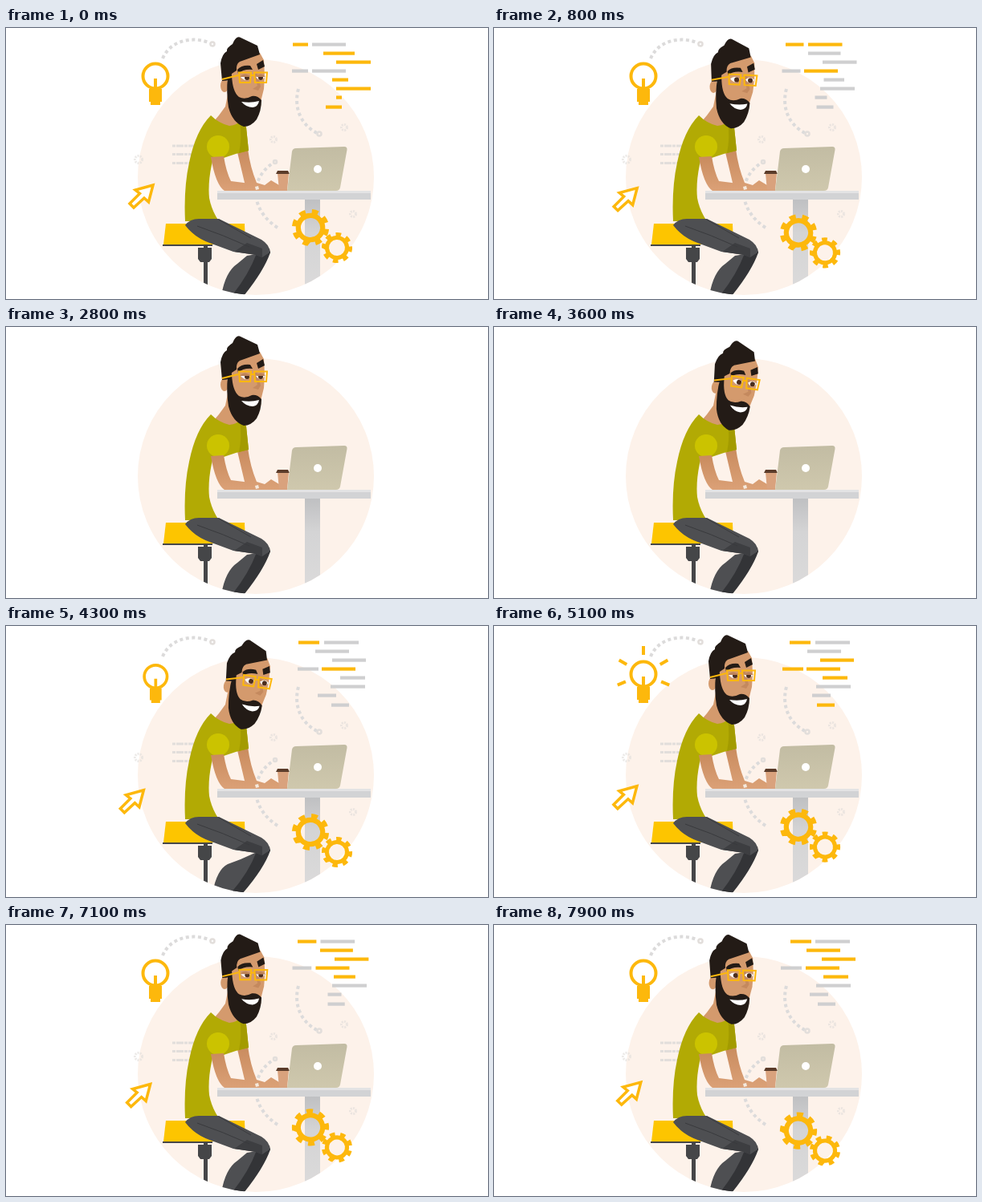
Animation of 600 by 338 pixels, one loop 8000 ms. Source, as an HTML page:

```html
<!DOCTYPE html>
<html lang="en">
<head>
<meta charset="utf-8">
<title>Working at a laptop</title>
<style>
html, body { margin: 0; width: 100%; height: 100%; overflow: hidden; background: #fff; }
svg { display: block; width: 600px; height: 338px; }
.line { fill: none; stroke: #fdb80c; }
.dots { fill: none; stroke: #dcdbdb; stroke-width: 4; stroke-dasharray: 4 3.6; }
.faint { fill: none; stroke: #e2dedb; }
</style>
</head>
<body>
<svg viewBox="0 0 600 338">
  <defs>
    <clipPath id="disc"><circle cx="311" cy="186" r="147"/></clipPath>
    <linearGradient id="lid" x2="0" y2="1"><stop stop-color="#c2bca3"/><stop offset="1" stop-color="#cfc8ad"/></linearGradient>
    <linearGradient id="post" x2="0" y2="1"><stop stop-color="#bfc0c2"/><stop offset=".35" stop-color="#d4d4d5"/><stop offset="1" stop-color="#dcdbdb"/></linearGradient>
    <linearGradient id="arm" x2="0" y2="1"><stop stop-color="#c98b5e"/><stop offset="1" stop-color="#dba177"/></linearGradient>
  </defs>
  <circle cx="311" cy="186" r="147" fill="#fdf2ea"/>

  <g id="faint">
    <path class="dots" d="M195 38C205 14 235 10 254 19M364 76C358 98 366 120 387 131M338 249C304 227 302 188 333 168"/>
    <g class="faint" stroke-width="2.5">
      <circle cx="257" cy="20" r="2.5"/><circle cx="390" cy="132" r="2.5"/><circle cx="335" cy="167" r="2"/>
    </g>
    <path class="faint" stroke-width="3" stroke-dasharray="4 1 9 1" d="M207 147H236M207 157.500H236M207 168.500H236"/>
    <g class="faint" stroke-width="3" stroke-dasharray="2 1.200" opacity=".65">
      <circle cx="165" cy="164" r="4.500"/><circle cx="333" cy="139" r="3.500"/>
      <circle cx="421" cy="124" r="3.500"/><circle cx="432" cy="232" r="3.500"/>
    </g>
  </g>

  <g clip-path="url(#disc)">
    <path fill="url(#post)" d="M372 214h19v120h-19z"/>
    <path fill="#454648" d="M246 271h5v60h-5zM239 274h17v14l-3 4h-11l-3-4z"/>
    <path fill="#fdc500" d="M199 244H297L298 270H196Z"/>
    <path fill="#474747" d="M195 270h62v2h-62z"/>
  </g>

  <path fill="#d49a6d" d="M277 78L273 98L265 109L259 116L278 130L294 119L296 100Z"/>
  <path fill="url(#arm)" d="M288 155L301 151Q304 174 312 193L322 196L330 190L340 196L345 203H303L297 193Q293 176 288 155Z"/>
  <path fill="#b2aa04" d="M255 109Q265 119 278 122Q288 121 291 116Q297 118 299 124L302 153L286 157L271 162L257 166Q251 192 253 212Q256 228 265 241H223Q221 200 228 168Q236 128 255 109Z"/>
  <path fill="#a39b00" d="M291 116Q297 118 299 124L302 153L290 156Q294 137 291 116Z"/>
  <circle cx="264" cy="148" r="14" fill="#cbc300"/>
  <path fill="url(#arm)" d="M255 161L271 160Q274 179 280 191L304 194L315 199L313 203H272Q261 196 255 161Z"/>
  <path fill="#f4e9dd" d="M310 198l4-1 1 4-4 1z"/>

  <g clip-path="url(#disc)">
    <path id="shin" fill="#4e4f52"/>
    <path id="shade" fill="#333437"/>
    <path fill="#4e4f52" d="M223 246Q229 238 240 238H265L318 264Q329 271 328 280L319 286L311 283L283 279L256 269Q235 262 223 246Z"/>
    <path fill="#3d3e41" d="M300 268L319 275L319 286L311 283L284 279Z"/>
    <path fill="none" stroke="#393a3d" d="M238 247Q270 258 303 273M265 239L305 262"/>
  </g>

  <path fill="#d2d3d5" d="M263 203H454V214H263Z"/>
  <path fill="#e3e3e4" d="M263 203H454V206H263Z"/>
  <path fill="#d9a27d" d="M338 181h14l-2 22h-10z"/>
  <path fill="#5b3c2a" d="M338 178h13l2 4h-17z"/>
  <path fill="url(#lid)" d="M361 150L421 148Q425 148 424.500 152L416 199Q415 203 411 203H350L356 154Q357 150 361 150Z"/>
  <circle cx="388" cy="176" r="5" fill="#fff"/>

  <g id="head">
    <path fill="#d49a6d" d="M276 48L316 31L321 40L322 60L321 76L317 92L285 99L276 84Z"/>
    <path fill="#c4895e" d="M309 57L313 72L307 76L314 78L317 73L313 57Z"/>
    <ellipse cx="272" cy="72" rx="5" ry="8" fill="#d49a6d"/>
    <path fill="#231b16" d="M269 66L267 44Q269 32 275 29Q274 25 282 20Q286 10 291 11.500L313 22L316 33L291 42Q286 45 287 53L281 57L280 65Z"/>
    <path fill="#231b16" d="M276 62L281 59Q282 80 290 86Q297 90 306 85Q313 84 318 90Q318 103 312 114Q305 123 296 123Q282 118 277 99Q274 80 276 62Z"/>
    <path fill="#fff" d="M293 92Q305 94 315 91Q314 98 307 99Q299 99 293 92Z"/>
    <path fill="#231b16" d="M288 52Q293 46 304 47L307 52Q295 51 289 57ZM312 45L320 40L322 48L314 52Z"/>
    <path fill="#fff" d="M292 61q6-5 12 0q-5 8-12 0M311 61q6-5 11 0q-5 8-11 0"/>
    <circle cx="300" cy="62" r="3" fill="#4c2d1d"/><circle cx="317" cy="62" r="3" fill="#4c2d1d"/>
    <path id="lids" fill="#bd835a" d="M291 61q6-7 14 0zM311 61q6-7 12 0z"/>
    <path class="line" stroke-width="2" d="M269 64L289 59M290 55.500H305L304 68H291ZM309 55.500H325L324 68H310ZM305 59H309"/>
  </g>

  <g id="lines"></g>
  <g id="gears"></g>
  <g id="bulb">
    <circle class="line" cx="186" cy="60" r="15.500" stroke-width="4"/>
    <path fill="#fdb80c" d="M184 63h4v13h6v16h-2v4h-12v-4h-2V76h6z"/>
    <path id="rays" class="line" stroke-width="4"/>
  </g>
  <path id="arrow" fill="#fff" stroke="#fdb80c" stroke-width="3.500" d="M183 196L161 202L166.500 206.500L154 219L159 224L172 212L177.500 217Z"/>
</svg>

<script>
const $ = id => document.getElementById(id);
const set = (el, attrs) => { for (const k in attrs) el.setAttribute(k, attrs[k]); };
const make = (tag, parent, attrs) => {
  const el = parent.appendChild(document.createElementNS('http://www.w3.org/2000/svg', tag));
  set(el, attrs);
  return el;
};
const mix = (a, b, k) => a + (b - a) * k;
const ease = (a, b, x) => {
  const k = Math.min(1, Math.max(0, (x - a) / (b - a)));
  return k * k * (3 - 2 * k);
};
const wave = (t, period) => (1 - Math.cos(t / period * 2 * Math.PI)) / 2;

// Code lines: positions per pose, short and full widths; "y" marks yellow.
const rowY = [20, 20, 31, 42, 53, 53, 64, 75, 86, 98];
const shortW = [19, 42, 39, 43, 20, 42, 20, 43, 7, 20];
const fullW = [26, 43, 42, 42, 26, 42, 31, 43, 23, 22];
const poses = [
  { t: 0, full: 0, hue: 'ygyyggyyyy', x: [357, 381, 395, 411, 356, 381, 406, 411, 411, 398] },
  { t: 1600, full: 1, hue: 'yygggygggg', x: [369, 401, 387, 407, 361, 391, 415, 401, 388, 405] },
  { t: 4300, full: 1, hue: 'yggggygggg', x: [364, 396, 385, 406, 363, 393, 416, 404, 388, 405] },
  { t: 5100, full: 1, hue: 'yggyyyyggy', x: [368, 400, 390, 406, 359, 389, 409, 401, 396, 402] },
  { t: 6300, full: .25, hue: 'ygyyggyyyy', x: [357, 383, 393, 410, 356, 383, 406, 411, 408, 398] },
  { t: 7900, full: 1, hue: 'ygyygyyggg', x: [369, 400, 389, 408, 357, 388, 410, 401, 393, 403] }
];
const bars = rowY.map(y => make('rect', $('lines'), { y: y - 1.5, height: 4.2 }));

const gears = [[379, 249, 23, 1], [412, 274, 19, -1]].map(([x, y, r, dir]) => {
  const el = make('g', $('gears'), {});
  make('circle', el, { class: 'line', r: r * .66, 'stroke-width': r * .27 });
  make('circle', el, { class: 'line', r: r * .88, 'stroke-width': r * .25, pathLength: 16, 'stroke-dasharray': '1 1' });
  return { el, x, y, dir };
});

function drawLines(t, show) {
  let i = poses.findIndex(p => p.t > t) - 1;
  if (i < 0) i = poses.length - 2;
  const a = poses[i], b = poses[i + 1];
  const k = ease(a.t, b.t, t);
  const hue = (k < .5 ? a : b).hue;
  const full = mix(a.full, b.full, k);
  bars.forEach((bar, n) => set(bar, {
    x: mix(a.x[n], b.x[n], k),
    width: mix(shortW[n], fullW[n], full) * show,
    fill: hue[n] === 'y' ? '#fdb80c' : '#cfcfd0'
  }));
}

// Rays shoot outwards, then their inner ends catch up.
function drawRays(t) {
  const from = 24 + 11 * ease(5700, 6500, t), to = 24 + 11 * ease(4500, 4900, t);
  const d = [-150, -90, -30, 23, 157].map(deg => {
    const c = Math.cos(deg * Math.PI / 180), s = Math.sin(deg * Math.PI / 180);
    const at = r => `${186 + c * r} ${60 + s * r}`;
    return `M${at(from)}L${at(to)}`;
  }).join('');
  set($('rays'), { d, opacity: to - from > .1 ? 1 : 0 });
}

function draw(t) {
  const shown = end => 1 - ease(2200, 2600, t) + ease(3600, end, t);
  const show = shown(4200);
  const around = (x, y, k) => `translate(${x} ${y}) scale(${k}) translate(${-x} ${-y})`;

  const beat = t % 2400 / 2400;
  const nod = ease(.24, .46, beat) - ease(.82, .98, beat);
  set($('head'), { transform: `rotate(${8.3 * nod} 255 100)` });
  set($('lids'), { opacity: nod < .1 ? 1 : 0 });

  const step = t % 2000 / 2000;
  const kick = ease(.03, .12, step) - ease(.22, .35, step);
  const heel = 268 - 11 * kick, toe = 295 - 2 * kick;
  set($('shin'), { d: `M324 270L329 280L${toe} 334H${heel}Q${heel + 5} 304 ${288 - 12 * kick} ${294 + 3 * kick}L${300 - 8 * kick} ${284 + 7 * kick}L312 282Z` });
  set($('shade'), { d: `M328 275L329 280Q321 303 ${toe + 1} 334H${toe - 14}Q302 308 312 281Z` });

  set($('faint'), { opacity: show });
  set($('bulb'), { transform: around(190, 97, shown(4450)) });
  drawLines(t, show);
  drawRays(t);
  gears.forEach(g => set(g.el, {
    transform: `translate(${g.x} ${g.y + 8 * wave(t, 1230)}) scale(${show}) rotate(${g.dir * (t * .01 + 5)})`
  }));
  const back = wave(t, 656);
  set($('arrow'), { transform: `translate(${-12 * back} ${9 * back}) ${around(168, 210, show)}` });
}

function frame() {
  draw(Math.floor(performance.now() % 8000 / 100) * 100);
  requestAnimationFrame(frame);
}
frame();
</script>
</body>
</html>
```
